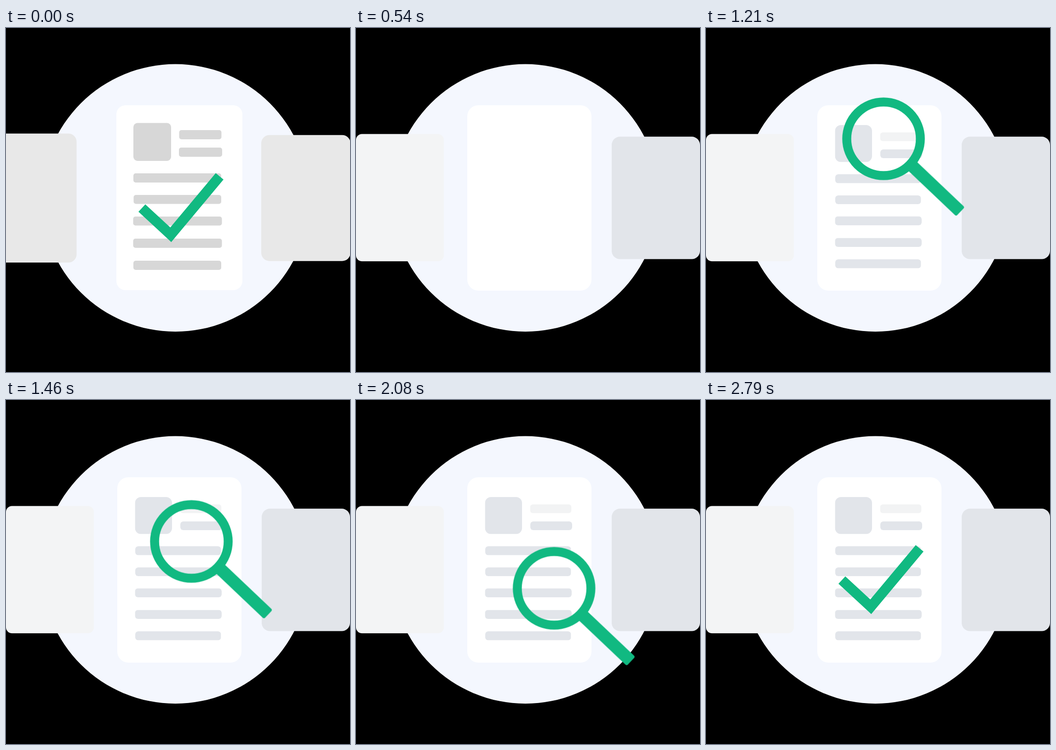
Write an HTML page that moves like this. It is 748x748 px and loops after 3000 ms.

```html
<!DOCTYPE html>
<html lang="en">
<head>
<meta charset="utf-8">
<title>Document review</title>
<style>
  html, body { margin: 0; width: 100%; height: 100%; overflow: hidden; background: #000; }
  svg { display: block; width: 100vw; height: 100vh; }
  svg * { animation: 0s linear infinite; }

  .page, .next, .side, .gone, .old, .old-tick, .fresh, .lens, .tick { animation-duration: 3s; }
  .green { fill: none; stroke: #11b981; }

  /* Carousel: every card moves one place to the left */
  .gone { animation-name: gone; }
  @keyframes gone {
    0%, 1% { transform: none; animation-timing-function: cubic-bezier(.5, 0, .8, .6); }
    9.5%, 100% { transform: translateX(-170px); }
  }
  .page { animation-name: page; }
  @keyframes page {
    0%, 1.2% { x: 240px; y: 168px; width: 274px; height: 402px; rx: 20px; fill: #fff;
      animation-timing-function: cubic-bezier(.55, 0, .75, .5); }
    11% { x: 121px; y: 191px; width: 243px; height: 355px; rx: 18px; fill: #f8f9fb;
      animation-timing-function: cubic-bezier(.25, .5, .5, 1); }
    18%, 100% { x: 0; y: 230.4px; width: 191px; height: 276.8px; rx: 13px; fill: #f3f4f5; }
  }
  .old { animation-name: old; transform-origin: 377px 369px; }
  @keyframes old {
    0%, 1.2% { transform: none; opacity: 1; animation-timing-function: cubic-bezier(.55, 0, .75, .5); }
    11% { transform: translateX(-138px) scale(.908); opacity: 1;
      animation-timing-function: cubic-bezier(.25, .5, .5, 1); }
    18%, 100% { transform: translateX(-281px) scale(.69); opacity: 0; }
  }
  .old-tick { animation-name: old-tick; transform-origin: 380.5px 390px; }
  @keyframes old-tick {
    0%, 1.2% { transform: none; opacity: 1; animation-timing-function: cubic-bezier(.55, 0, .75, .5); }
    11% { transform: translate(-149.5px, -2.5px) scale(.82); opacity: .75;
      animation-timing-function: cubic-bezier(.25, .5, .5, 1); }
    17%, 100% { transform: translate(-285px, -5px) scale(.6); opacity: 0; }
  }
  .next { animation-name: next; }
  @keyframes next {
    0%, 1.2% { x: 555px; y: 232.7px; width: 194px; height: 274px; rx: 18px; fill: #e8e8e8;
      animation-timing-function: cubic-bezier(.55, 0, .75, .5); }
    11% { x: 452px; y: 211px; width: 218px; height: 317px; rx: 20px; fill: #f0f0f0;
      animation-timing-function: cubic-bezier(.25, .5, .5, 1); }
    18%, 100% { x: 242px; y: 168px; width: 270px; height: 403px; rx: 24px; fill: #fff; }
  }
  .side { animation-name: side; }
  @keyframes side {
    0%, 12.5% { transform: translateX(200px); animation-timing-function: ease-out; }
    18%, 100% { transform: none; }
  }

  /* Lines are written one after the other */
  .fresh { animation-name: fresh; animation-timing-function: step-end; }
  @keyframes fresh {
    0% { opacity: 0; }
    18%, 100% { opacity: 1; }
  }
  .fresh rect { animation: grow 3s linear var(--d, 545ms) infinite backwards; }
  @keyframes grow {
    0%, 83%, 100% { clip-path: inset(0 100% 0 0 round 6px); opacity: 0; }
    8.3%, 82.5% { clip-path: inset(0 0% 0 0 round 6px); opacity: 1; }
  }

  .lens { animation-name: lens; }
  @keyframes lens {
    0%, 26% { transform: translate(880px, 773px); }
    27.67% { transform: translate(720.5px, 601px); animation-timing-function: cubic-bezier(.2, .6, .5, 1); }
    33.3%, 39.9% { transform: translate(386px, 240.7px); animation-timing-function: ease-in-out; }
    57%, 62.7% { transform: translate(418.5px, 368px); animation-timing-function: ease-in-out; }
    79.3% { transform: translate(455px, 492px); }
    80.67% { transform: translate(513px, 534.5px); animation-timing-function: ease-in; }
    86.5%, 100% { transform: translate(860px, 860px); }
  }
  .tick { stroke-dasharray: 1 2; animation-name: tick; }
  @keyframes tick {
    0%, 86% { stroke-dashoffset: 1.02; animation-timing-function: ease-in-out; }
    93%, 100% { stroke-dashoffset: 0; }
  }
</style>
</head>
<body>
<svg viewBox="0 0 748 748">
  <circle cx="368.3" cy="369.4" r="290.8" fill="#f4f7fe"/>

  <rect class="gone" x="-40" y="229.5" width="193.5" height="280.5" rx="18" fill="#e8e8e8"/>
  <rect class="page"/>
  <g class="old" fill="#d7d7d7">
    <rect x="277" y="206.5" width="82" height="82.5" rx="9"/>
    <rect x="376.5" y="222" width="92" height="20" rx="5"/>
    <rect x="376" y="260" width="94" height="20" rx="5"/>
    <rect x="277" y="316" width="191" height="20" rx="5"/>
    <rect x="277.5" y="363" width="190.5" height="19.5" rx="5"/>
    <rect x="276.5" y="410" width="193" height="19.5" rx="5"/>
    <rect x="276.5" y="458" width="193" height="20" rx="5"/>
    <rect x="277" y="506" width="191" height="20" rx="5"/>
  </g>
  <path class="green old-tick" d="M295.5 391.5 358.3 449.5 464.5 322.5" stroke-width="22"/>

  <rect class="side" x="556" y="236.3" width="192" height="266.3" rx="18" fill="#e2e5ea"/>
  <rect class="next"/>
  <g class="fresh" fill="#e2e5ea">
    <rect x="280.5" y="211" width="80.5" height="80.5" rx="13"/>
    <rect x="378.5" y="227" width="90" height="19" rx="5" fill="#f2f3f4"/>
    <rect x="379" y="264" width="91" height="19" rx="6"/>
    <rect x="281" y="318" width="186.5" height="19.5" rx="6"/>
    <rect x="281" y="364" width="186.5" height="19" rx="6"/>
    <rect x="280.5" y="409.5" width="188.5" height="19.5" rx="6" style="--d: 578ms"/>
    <rect x="280.5" y="456.5" width="188.5" height="19.5" rx="6" style="--d: 620ms"/>
    <rect x="281" y="503" width="186.5" height="19.5" rx="6" style="--d: 662ms"/>
  </g>

  <path class="green tick" d="M295.5 391.5 358.3 449.5 464.5 322.5" stroke-width="22" pathLength="1"/>
  <g class="lens">
    <circle class="green" r="80" stroke-width="19.5"/>
    <rect x="80" y="-13.5" width="150.5" height="27" rx="4" fill="#11b981" transform="rotate(43.5)"/>
  </g>
</svg>
</body>
</html>
```
